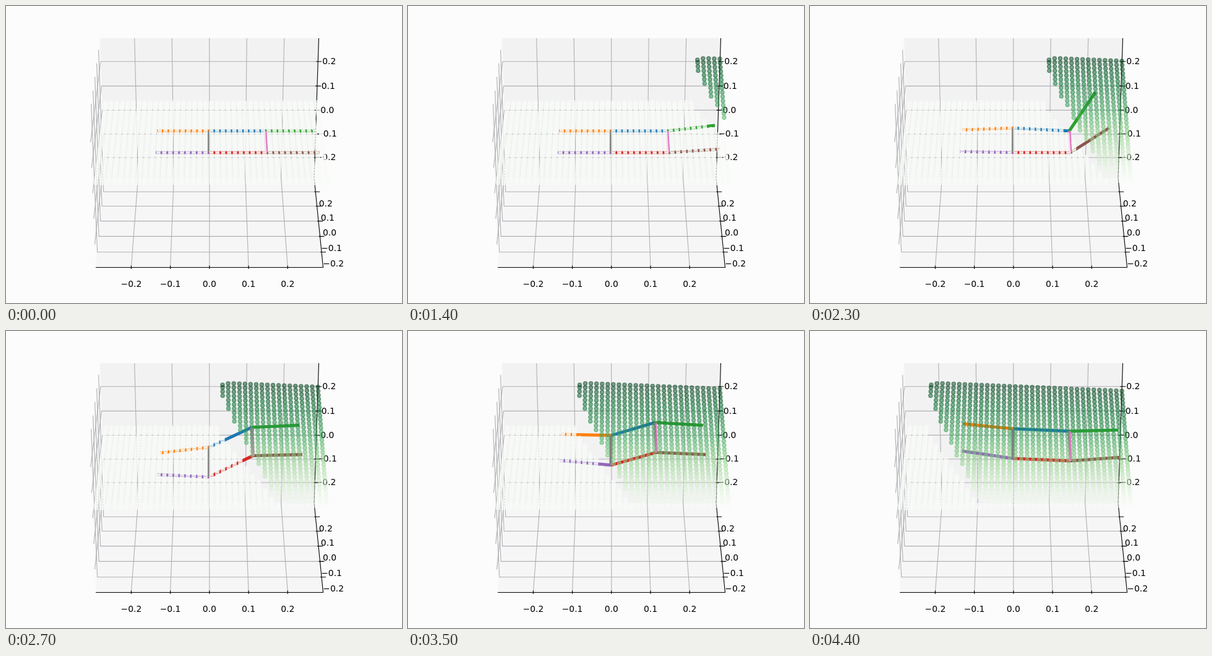
These frames come from a looping animation (640 by 480 pixels, 4.6 s). An HTML page with a canvas:

```html
<!DOCTYPE html>
<html lang="en">
<head>
<meta charset="utf-8">
<title>Travelling wave under a jointed raft</title>
<style>
  html, body { margin: 0; width: 100%; height: 100%; overflow: hidden; background: #fcfcfc; }
  svg, canvas { position: absolute; left: 0; top: 0; width: 640px; height: 480px; }
  text { font: 13.89px "DejaVu Sans", sans-serif; text-anchor: middle; }
  .grid { stroke: #b0b0b4; stroke-width: 1.1; fill: none; }
  .axis { stroke: #000; stroke-width: 1.1; fill: none; }
</style>
</head>
<body>
<svg id="axes" viewBox="0 0 640 480">
  <path fill="#f9f9f9" d="M152 52L160 278L145 422L135 182Z"/>
  <path fill="#f2f2f3" d="M152 52H505.5L498 278H160Z"/>
  <path fill="#f6f6f7" d="M160 278H498L512.5 422H145Z"/>
</svg>
<canvas id="stage" width="640" height="480"></canvas>
<script>
const LOOP = 4600, HOLD = 1000, STEP = 100, LAST = 35;
const MID = 329;                                  // screen x of the plot's zero
const ROWS = 30, COLS = 39, PITCH = 0.1505, RIGHT = 2.907;

// ---- axes ----
const svg = document.getElementById('axes');
function add(tag, attrs, text) {
  const el = document.createElementNS('http://www.w3.org/2000/svg', tag);
  for (const name in attrs) el.setAttribute(name, attrs[name]);
  if (text) el.textContent = text;
  svg.appendChild(el);
}
const path = (cls, d) => add('path', { class: cls, d });
const label = (x, y, n) =>
  add('text', { x, y: Math.round(y + 4.4) }, (n / 10).toFixed(1).replace('-', '\u2212'));

// n counts tenths; far and near spacing differ by perspective
const wallY = n => 168.4 - 38.8 * n - 0.25 * n * n;
const floorY = n => 347.6 - 24.4 * n + 0.35 * n * n;
const wallEdge = y => 505.5 - (y - 52) * 7.5 / 226;
const floorEdge = y => 498 + (y - 278) * 14.5 / 144;
const ticks = [2, 1, 0, -1, -2];

for (const n of ticks) {
  const z = wallY(n), y = floorY(n);
  path('grid', `M${MID - 0.3 + n * 60.5} 52L${MID + n * 57.8} 278L${MID - 0.2 + n * 63.2} 422`);
  path('grid', `M${140.1 - n * 1.7} ${302.6 - n * 41.3}L${155.8 - n * 1.4} ${z}H${wallEdge(z)}`);
  path('grid', `M${143.6 + n * 3} ${114.6 - n * 21.8}L${152.7 + n * 2.5} ${y}H${floorEdge(y)}`);
}
path('axis', 'M505.5 52L498 278L512.5 422.5H145');
for (const n of ticks) {
  const x = MID - 0.2 + n * 63.2, z = wallY(n), y = floorY(n);
  path('axis', `M${wallEdge(z) - 3} ${z}h9M${floorEdge(y) - 2} ${y}h9M${x} 419.5v5.5`);
  label(519.4 + n * 1.4, z, n);
  label(523 - n * 3.1, y + 19.2, n);
  label(x, 449.5, n);
}

// ---- raft ----
const ramp = (k, from, to) => Math.min(1, Math.max(0, (k - from) / (to - from)));
const swing = (k, from, peak, to) => Math.min(ramp(k, from, peak), 1 - ramp(k, peak, to));

// The wave lifts the head first, then the middle, then the root and tail;
// a link leans back while the front passes beneath it.
function pose(k) {
  const head = ramp(k, 4, 11), mid = ramp(k, 14, 19);
  const early = ramp(k, 12, 18), late = ramp(k, 23, 28), sink = ramp(k, 30, 35);
  const headLean = swing(k, 4, 13, 17), midLean = swing(k, 14, 23, 28);
  return {
    topTail:  [244 + 5 * early - 2 * late, 202 - 5 * early - 50 * late + 3 * sink],
    topRoot:  [328, 202 - 14 * early - 32 * late + 2 * sink],
    topMid:   [419 - 49 * midLean, 202 - 45 * mid - 23 * midLean + 5 * sink],
    topHead:  [502 - 4 * head - 49 * headLean - 53 * midLean,
               202 - 48 * head - 20 * headLean - 4 * midLean + 6 * sink],
    baseTail: [242 + 2 * early + 2 * late, 237 - 5 * early - 38 * late],
    baseRoot: [328, 237 - early - 32 * late + 2 * sink],
    baseMid:  [421 - 49 * midLean, 237 - 32 * mid - 22 * midLean + 5 * sink],
    baseHead: [507 - 5 * head - 25 * headLean - 52 * midLean,
               237 - 36 * head - 5 * headLean - 3 * midLean + 3 * sink]
  };
}
const links = [
  ['topRoot', 'topMid', '#1f77b4'], ['topTail', 'topRoot', '#ff7f0e'],
  ['topMid', 'topHead', '#2ca02c'], ['baseRoot', 'baseMid', '#d62728'],
  ['baseTail', 'baseRoot', '#9467bd'], ['baseMid', 'baseHead', '#8c564b'],
  ['topMid', 'baseMid', '#e377c2'], ['topRoot', 'baseRoot', '#7f7f7f']
];

// ---- sheet of points ----
const greens = ['f7fcf5', 'e5f5e0', 'c7e9c0', 'a1d99b', '74c476', '41ab5d', '238b45', '006d2c', '00441b']
  .map(hex => [0, 2, 4].map(i => parseInt(hex.slice(i, i + 2), 16)));
function shade(t) {
  const p = t * 8, i = Math.min(7, Math.floor(p));
  return `rgb(${greens[i].map((c, j) => Math.round(c + (greens[i + 1][j] - c) * (p - i)))})`;
}
const ctx = document.getElementById('stage').getContext('2d');

function dot(x, y, color, alpha) {
  ctx.globalAlpha = alpha;
  ctx.fillStyle = ctx.strokeStyle = color;
  ctx.beginPath();
  ctx.arc(x, y, 3.1, 0, 2 * Math.PI);
  ctx.fill();
  ctx.stroke();
}

function drawSheet(step) {
  ctx.lineWidth = 1.3;
  for (let r = 0; r < ROWS; r++) {
    const v = r / (ROWS - 1), color = shade(1 - v ** 1.2);
    for (let c = 0; c < COLS; c++) {
      const u = RIGHT - c * PITCH;
      const lag = step - 1 - c;      // steps since the front reached this column
      if (lag >= 0 && r <= 3.9 + 2.65 * lag) {
        const lip = 3 * Math.exp(-2 * (r + lag));
        const y = 84 + 198 * v + 0.38 * lag * (1 - v) + lip;
        dot(MID + u * (60.2 + 4.9 * v), y, color, 0.5);
      } else {
        dot(MID + u * (59.6 + 5.7 * v), 156 + 122 * v + 8 * v * v, '#f8fbf6', 0.65);
      }
    }
  }
}

function draw(step) {
  ctx.clearRect(0, 0, 640, 480);
  ctx.globalAlpha = 1;
  ctx.lineWidth = 5;
  const joints = pose(step);
  for (const [from, to, color] of links) {
    ctx.strokeStyle = color;
    ctx.beginPath();
    ctx.moveTo(...joints[from]);
    ctx.lineTo(...joints[to]);
    ctx.stroke();
  }
  drawSheet(step);
}

const start = performance.now();
let shown = -1;
function tick() {
  const t = (performance.now() - start) % LOOP;
  const step = t < HOLD ? 0 : Math.min(LAST, Math.floor((t - HOLD) / STEP) + 1);
  if (step !== shown) draw(shown = step);
  requestAnimationFrame(tick);
}
tick();
</script>
</body>
</html>
```
